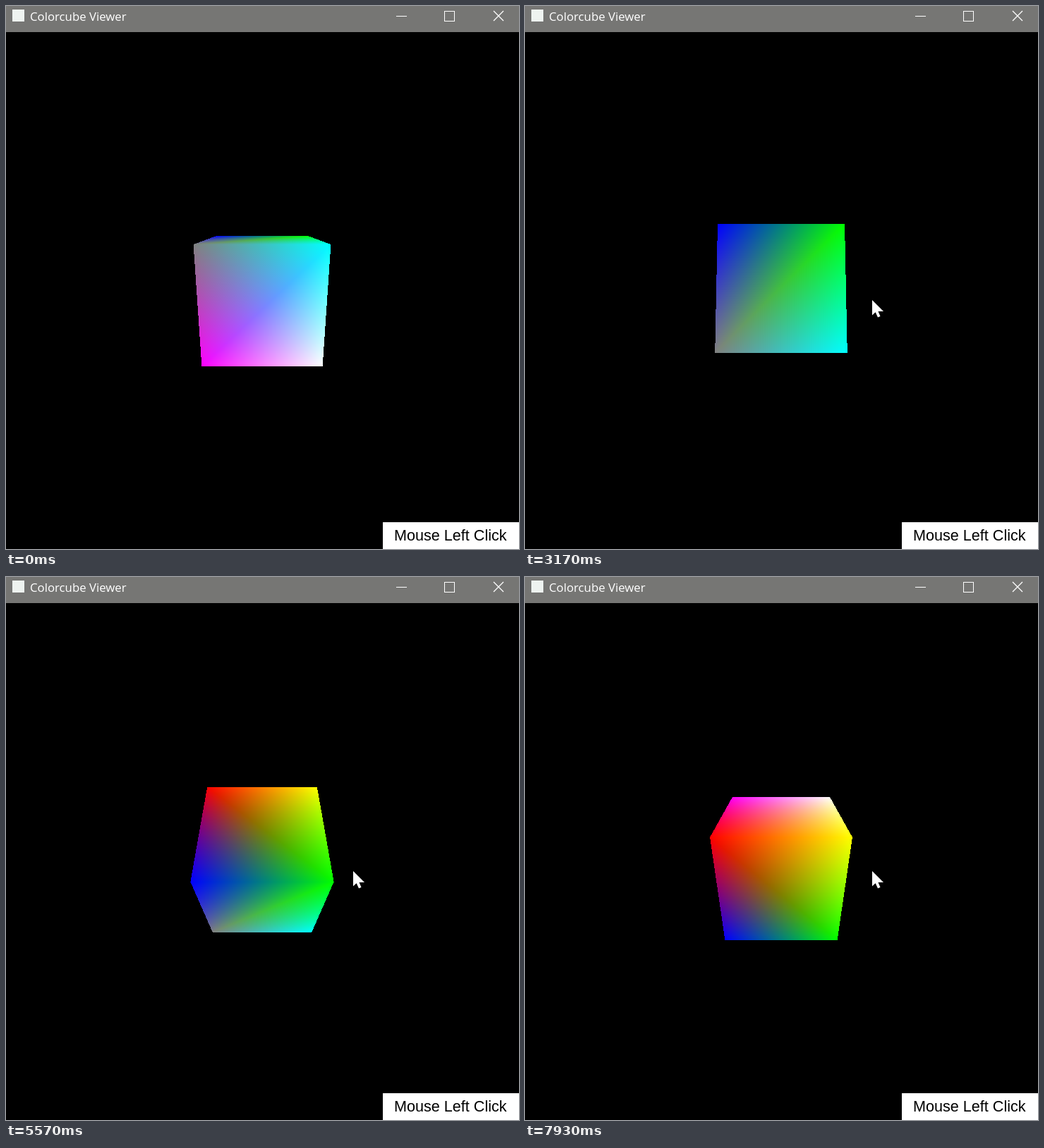
These frames come from a looping animation (727x770 px, 8 s). An HTML page with a canvas:

```html
<!DOCTYPE html>
<html lang="en">
<head>
<meta charset="utf-8">
<title>Colorcube Viewer</title>
<style>
  html, body { margin: 0; width: 100%; height: 100%; overflow: hidden; background: #000; }
  canvas, svg { position: absolute; display: block; }
  canvas { left: 255px; top: 288px; }
  svg { left: 0; top: 0; }
  .title { font: 16.8px "Open Sans", "Noto Sans", sans-serif; fill: #fff; }
  .label { font: 21.6px "Liberation Sans", Arial, sans-serif; fill: #000; }
</style>
</head>
<body>
<canvas id="view" width="218" height="236"></canvas>
<svg width="727" height="770" viewBox="0 0 727 770">
  <rect width="727" height="37" fill="#767674"/>
  <rect x="9" y="5" width="17" height="17" fill="#eef3f0"/>
  <text class="title" x="34" y="21">Colorcube Viewer</text>
  <g fill="none" stroke="#fff">
    <path d="M553 14.5H568"/>
    <rect x="621.5" y="7.5" width="14" height="14"/>
    <path d="M691 7L705 21M705 7L691 21" stroke-width="1.3"/>
  </g>
  <rect x="534" y="732" width="193" height="38" fill="#fff"/>
  <text class="label" x="550" y="758">Mouse Left Click</text>
  <path id="cursor" d="M0 0V21.5L4.7 17.2L8 24.5L11.5 23L8.5 16H16Z" fill="#fff"/>
</svg>
<script>
const LOOP = 8000, TICK = 100 / 3;
const CX = 363 - 255, CY = 406 - 288;
const FOCAL = 376, DIST = 5.09;
const QUARTER = Math.PI / 2;

const canvas = document.getElementById("view");
const cursor = document.getElementById("cursor");
const ctx = canvas.getContext("2d");
const image = ctx.createImageData(canvas.width, canvas.height);

// Corner colours in order around the rotation axis
const rgb = hex => [hex >> 16, hex >> 8 & 255, hex & 255];
const LEFT = [0x808080, 0x0000ff, 0xff0000, 0xff00ff].map(rgb);
const RIGHT = [0x00ffff, 0x00ff00, 0xffff00, 0xffffff].map(rgb);
const FLIPPED_FACE = 1; // its two triangles meet on the other diagonal

// Steady drags that turn the cube towards the viewer
const START_ANGLE = 29.5;
const DRAGS = [
  { from: 650, to: 1100, turn: 14.4 },
  { from: 1100, to: 2400, turn: 36 },
  { from: 2400, to: 6300, turn: 98.1 },
  { from: 6440, to: 6630, turn: 12 },
  { from: 6800, to: 7530, turn: 29 },
  { from: 7740, to: 7930, turn: 5 }
];

const progress = (t, from, to) => Math.min(1, Math.max(0, (t - from) / (to - from)));
const mix = (a, b, k) => a + (b - a) * k;

function cubeAngle(t) {
  const turned = DRAGS.reduce((sum, d) => sum + d.turn * progress(t, d.from, d.to), 0);
  return (START_ANGLE - turned) * Math.PI / 180;
}

function corner(side, i, angle) {
  const a = angle + i * QUARTER;
  const q = 1 / (DIST - Math.SQRT2 * Math.cos(a));
  return {
    x: CX + side * FOCAL * q,
    y: CY - Math.SQRT2 * Math.sin(a) * FOCAL * q,
    q,
    color: (side < 0 ? LEFT : RIGHT)[i % 4]
  };
}

// Smooth shading with perspective-correct weights
function fillTriangle(a, b, c) {
  const area = (b.x - a.x) * (c.y - a.y) - (b.y - a.y) * (c.x - a.x);
  if (Math.abs(area) < 1e-6) return;
  const { width, height, data } = image;
  const x0 = Math.max(0, Math.floor(Math.min(a.x, b.x, c.x)));
  const x1 = Math.min(width - 1, Math.ceil(Math.max(a.x, b.x, c.x)));
  const y0 = Math.max(0, Math.floor(Math.min(a.y, b.y, c.y)));
  const y1 = Math.min(height - 1, Math.ceil(Math.max(a.y, b.y, c.y)));
  for (let y = y0; y <= y1; y++) {
    for (let x = x0; x <= x1; x++) {
      const px = x + 0.5, py = y + 0.5;
      const u = ((b.x - px) * (c.y - py) - (b.y - py) * (c.x - px)) / area;
      const v = ((c.x - px) * (a.y - py) - (c.y - py) * (a.x - px)) / area;
      const w = 1 - u - v;
      if (Math.min(u, v, w) < -1e-9) continue;
      const ua = u * a.q, vb = v * b.q, wc = w * c.q, sum = ua + vb + wc;
      const p = (y * width + x) * 4;
      for (let k = 0; k < 3; k++) {
        data[p + k] = (ua * a.color[k] + vb * b.color[k] + wc * c.color[k]) / sum;
      }
      data[p + 3] = 255;
    }
  }
}

function drawCube(angle) {
  image.data.fill(0);
  for (let i = 0; i < 4; i++) {
    const facing = Math.cos(angle + (i + 0.5) * QUARTER);
    if (DIST * facing <= 1) continue;
    const quad = [
      corner(-1, i, angle), corner(1, i, angle),
      corner(1, i + 1, angle), corner(-1, i + 1, angle)
    ];
    if (i === FLIPPED_FACE) quad.push(quad.shift());
    const [a, b, c, d] = quad;
    fillTriangle(a, b, c);
    fillTriangle(a, c, d);
  }
  ctx.putImageData(image, 0, 0);
}

function moveCursor(t) {
  const k = progress(t, 300, 467);
  cursor.setAttribute("transform", `translate(${mix(524, 492, k)} ${mix(454.5, 417, k)})`);
  cursor.setAttribute("visibility", t < 299 ? "hidden" : "visible");
}

function render(now) {
  const t = Math.floor((now % LOOP + 4) / TICK) * TICK;
  drawCube(cubeAngle(t));
  moveCursor(t);
}

function loop() {
  render(performance.now());
  requestAnimationFrame(loop);
}
loop();
</script>
</body>
</html>
```
